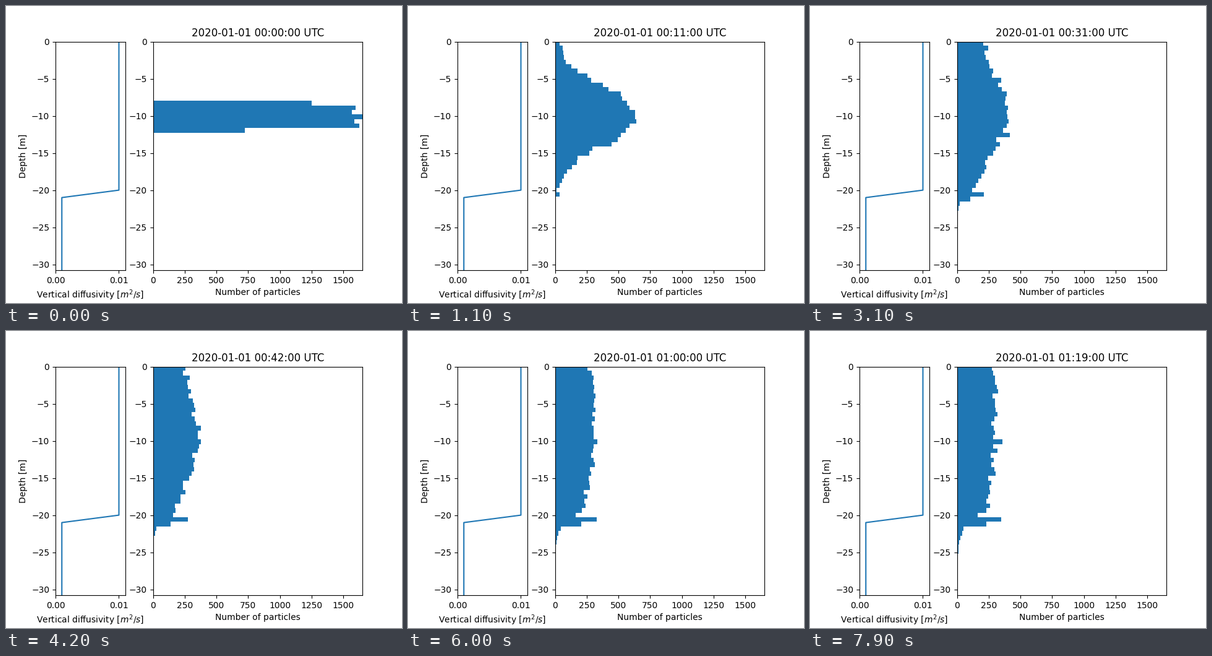
A matplotlib script that plays this animation: 640x480 px, repeating every 8000 ms.

```python
import numpy as np
import matplotlib.pyplot as plt
from matplotlib.animation import FuncAnimation

FRAMES, INTERVAL = 80, 100
DEPTH, BINS, X_MAX = 30.8, 50, 1651
BIN = DEPTH / BINS
SUBSTEPS = 3
DT = 60 / SUBSTEPS
K_TOP, K_LOW, STEP_DEPTH = 0.01, 0.001, 20

# Bin edges, deepest first
edges = 0.048 - BIN * np.arange(BINS, -1, -1)

# The release: particles per bin, from the 14th bin downwards
RELEASE = [1250, 1597, 1568, 1651, 1588, 1625, 721]
FIRST = 13


def release(rng):
    tops = edges[::-1][FIRST:FIRST + len(RELEASE)]
    return np.concatenate([top - BIN * rng.random(n)
                           for top, n in zip(tops, RELEASE)])


def mix(z, rng):
    """One random-walk step, diffusivity read at the nearest metre level."""
    level = np.round(-z)
    k = np.where(level <= STEP_DEPTH, K_TOP, K_LOW)
    near_step = (level == STEP_DEPTH) | (level == STEP_DEPTH + 1)
    drift = np.where(near_step, (K_TOP - K_LOW) / 2, 0)
    kick = rng.uniform(-1, 1, z.size) * np.sqrt(6 * k * DT)
    return -np.abs(z + drift * DT + kick)


def simulate():
    rng = np.random.default_rng(4)
    z = release(rng)
    counts = [np.histogram(z, edges)[0]]
    for _ in range(FRAMES - 1):
        for _ in range(SUBSTEPS):
            z = mix(z, rng)
        counts.append(np.histogram(z, edges)[0])
    return counts


counts = simulate()

fig, (axk, axn) = plt.subplots(1, 2, figsize=(6.4, 4.8), dpi=100,
                               gridspec_kw={"width_ratios": [1, 3]})

axk.plot([K_TOP, K_TOP, K_LOW, K_LOW],
         [0, -STEP_DEPTH, -STEP_DEPTH - 1, -DEPTH - 1])
axk.set_xlim(0, 1.1 * K_TOP)
axk.set_xticks([0, K_TOP], ["0.00", "0.01"])
axk.set_xlabel("Vertical diffusivity [$m^2/s$]")
axk.set_ylabel("Depth [m]")

bars = axn.barh(edges[:-1], counts[0], height=BIN, align="edge",
                color="C0", linewidth=0)
axn.set_xlim(0, X_MAX)
axn.set_xticks(range(0, 1501, 250))
axn.set_xlabel("Number of particles")
title = axn.set_title("")

for ax in (axk, axn):
    ax.set_ylim(-DEPTH, 0)
    ax.set_yticks(range(-30, 1, 5))


def draw(minute):
    for bar, n in zip(bars, counts[minute]):
        bar.set_width(n)
    title.set_text(f"2020-01-01 {minute // 60:02d}:{minute % 60:02d}:00 UTC")
    return [*bars, title]


anim = FuncAnimation(fig, draw, frames=FRAMES, interval=INTERVAL,
                     repeat=True, repeat_delay=0, blit=False)
plt.show()
```
